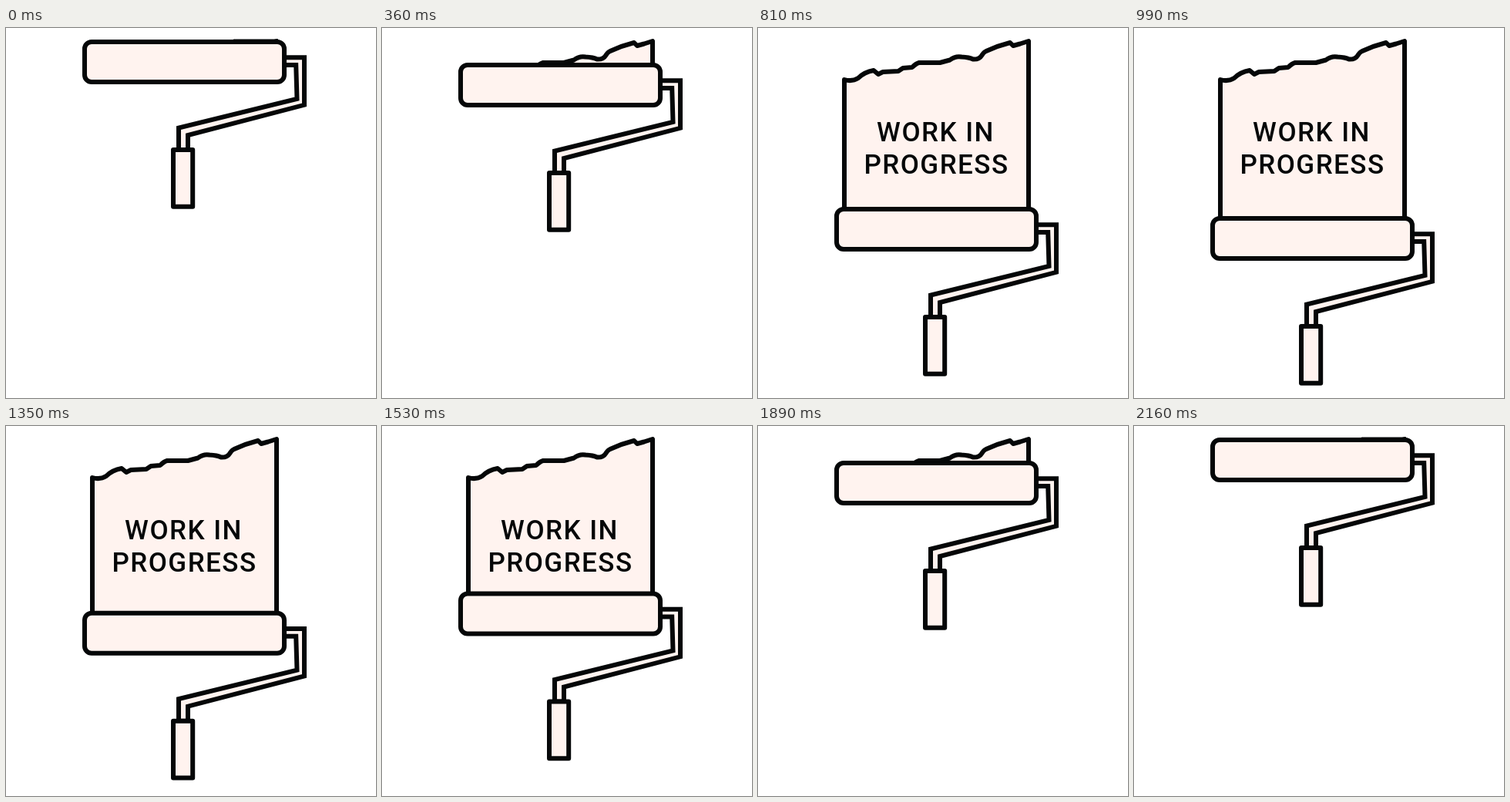
An HTML page for the animation above (2.25 s loop, 480 by 480 pixels).

```html
<!DOCTYPE html>
<html lang="en">
<head>
<meta charset="utf-8">
<title>Work in progress</title>
<style>
  html, body { margin: 0; width: 100%; height: 100%; overflow: hidden; background: #fff; }
  svg { display: block; width: 100%; height: 100%; }
  .ink { fill: #fff3ef; stroke: #050708; stroke-width: 6; stroke-linejoin: round; }
  text { font: 500 35px Roboto, Arial, sans-serif; fill: #050708; text-anchor: middle; letter-spacing: 1.5px; }
</style>
</head>
<body>
<svg viewBox="0 0 480 480">
  <clipPath id="rolled"><rect id="shown" width="480" height="44"/></clipPath>
  <g clip-path="url(#rolled)">
    <path class="ink" d="M112 480 V67 Q122 70 130 65 Q138 57 150 55 L156 60 L162 57 L182 56
      L188 52 L200 51 Q205 46 209 45 H236 L249 41.5 Q256 36 264 37.5 Q274 38 279 40.5
      Q287 41 290 36 Q293 31 296 30 Q311 23 327 19 L331 23 L340 20.5 L351 17 V480 Z"/>
    <text x="230.5" y="146.5">WORK IN</text>
    <text x="231.5" y="189">PROGRESS</text>
  </g>
  <g id="roller">
    <path class="ink" style="stroke-linejoin:miter" d="M361 38.2 H387 V99.8 L236 139 V158
      H224 V129.5 L377.5 92 L376.2 48 H361 Z"/>
    <rect class="ink" x="217" y="158" width="25.2" height="73.7"/>
    <rect class="ink" x="102" y="18" width="259" height="52" rx="9"/>
    <path id="lip" d="M295 17 H353" stroke="#050708" stroke-width="5"/>
  </g>
</svg>
<script>
  const STEP = 90, LOOP = 2250;
  const travel = [0, 0, 4, 12, 30, 70, 113.5, 160, 199.5, 217, 224.7, 229];
  const [shown, roller, lip] = ['shown', 'roller', 'lip'].map(id => document.getElementById(id));

  // Down, hold, then the same steps back up.
  function offset(t) {
    const slot = Math.floor(t / STEP);
    const i = slot < 15 ? Math.min(slot, 11) : 25 - slot;
    return travel[i];
  }

  function draw(now) {
    const y = offset(now % LOOP);
    roller.setAttribute('transform', `translate(0 ${y})`);
    shown.setAttribute('height', 44 + y);
    lip.style.opacity = y ? 0 : 1;
  }

  const start = performance.now();
  function tick() {
    draw(performance.now() - start);
    requestAnimationFrame(tick);
  }
  tick();
</script>
</body>
</html>
```
